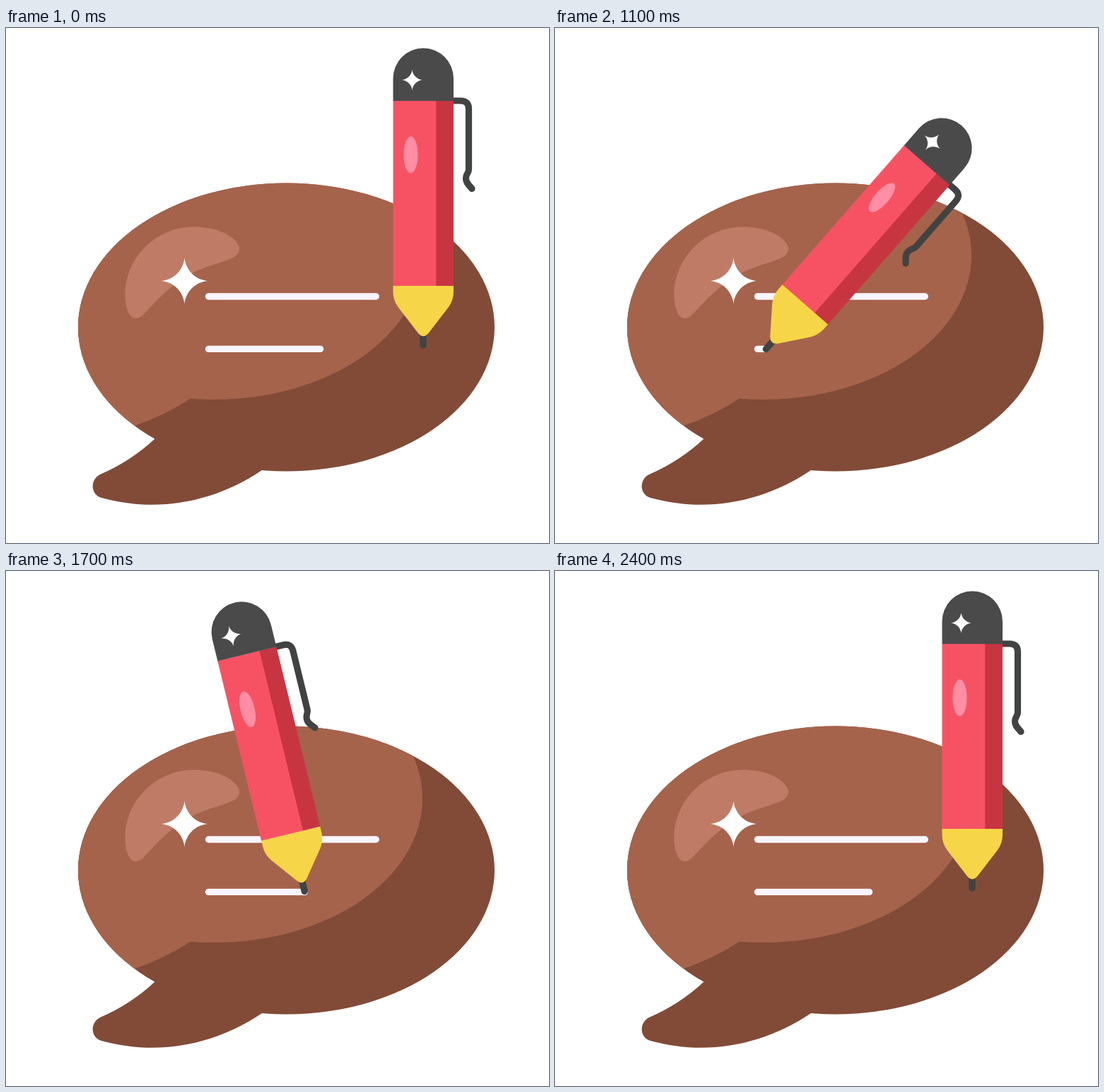
An HTML page with a canvas that plays this animation: 768 by 729 pixels, repeating every 2.7 s.

```html
<!DOCTYPE html>
<html lang="en">
<head>
<meta charset="utf-8">
<title>Pen and speech bubble</title>
<style>
html, body { margin: 0; width: 100%; height: 100%; overflow: hidden; background: #fff; }
canvas { display: block; }
</style>
</head>
<body>
<canvas id="stage" width="768" height="729"></canvas>
<script>
const ctx = document.getElementById('stage').getContext('2d');
const LOOP = 2700, STEP = 100;
const LINE = { left: 286.5, right: 444.5, y: 454.4 };

// Pen tip and tilt (degrees) at the ends of each move
const REST = { x: 590, y: 449.5, tilt: 0 };
const START = { x: 286.5, y: 455, tilt: 46.2 };
const END = { x: 444.5, y: 453.7, tilt: -23.4 };

const reach = [[300, 0], [600, 0.7], [700, 0.89], [800, 1]];
const write = [[1000, 0], [1100, 0.073], [1300, 0.402], [1700, 0.86], [1800, 1]];
const leave = [[1900, 0], [2400, 1]];

const mix = (a, b, p) => a + (b - a) * p;
const mixPose = (a, b, p) => ({
  x: mix(a.x, b.x, p), y: mix(a.y, b.y, p), tilt: mix(a.tilt, b.tilt, p)
});

function progress(keys, t) {
  if (t <= keys[0][0]) return 0;
  for (let i = 1; i < keys.length; i++) {
    const [t0, v0] = keys[i - 1], [t1, v1] = keys[i];
    if (t <= t1) return mix(v0, v1, (t - t0) / (t1 - t0));
  }
  return 1;
}

function fill(path, color) {
  ctx.fillStyle = color;
  ctx.fill(new Path2D(path));
}

function oval(x, y, rx, ry, color) {
  ctx.beginPath();
  ctx.ellipse(x, y, rx, ry, 0, 0, Math.PI * 2);
  ctx.fillStyle = color;
  ctx.fill();
}

function stroke(path, color, width) {
  ctx.strokeStyle = color;
  ctx.lineWidth = width;
  ctx.lineCap = 'round';
  ctx.stroke(new Path2D(path));
}

function star(x, y, r) {
  const a = r * 0.05, b = r * 0.47;
  ctx.save();
  ctx.translate(x, y);
  ctx.beginPath();
  ctx.moveTo(0, -r);
  for (let i = 0; i < 4; i++) {
    ctx.bezierCurveTo(a, -b, b, -a, r, 0);
    ctx.rotate(Math.PI / 2);
  }
  ctx.fillStyle = '#fff';
  ctx.fill();
  ctx.restore();
}

function drawBubble() {
  const dark = '#824b37', light = '#a5634c';
  fill('M211 581 Q177 613 133 632 C119 639 119 660 135 665 ' +
       'C215 687 295 671 362 626 L330 560 Z', dark);
  oval(396.5, 423.5, 294.5, 204, dark);

  ctx.save();
  ctx.beginPath();
  ctx.ellipse(396.5, 423.5, 294.5, 204, 0, 0, Math.PI * 2);
  ctx.clip();
  oval(294.5, 322, 294.5, 204, light);
  fill('M261 524.5 Q225 548 182 563 L90 580 V300 H261 Z', light);
  ctx.restore();

  fill('M168.5 378 C168.5 325 212 281.5 266 281.5 C294 281.5 319 291 328 306 ' +
       'C333 314 329 321 320 325.5 C300 335 266 339 236 365 ' +
       'C215 382 203 397 194 406 C187 412.5 180 413 175 406 ' +
       'C170.5 399 168.5 389 168.5 378 Z', '#bf7b65');
  star(252.5, 358, 32.5);
}

function drawLine(x0, x1, y) {
  stroke(`M${x0} ${y} H${x1}`, '#f7f5ff', 9.4);
}

function drawPen({ x, y, tilt }) {
  ctx.save();
  ctx.translate(x, y);
  ctx.rotate(tilt * Math.PI / 180);
  ctx.translate(-REST.x, -REST.y);

  stroke('M633 103 H643 Q654.5 103 654.5 114.5 V200 C654.5 206 650.5 206 650.5 213 ' +
         'C650.5 219 654.5 222 659 227.5', '#414342', 9.2);
  stroke('M590 430 V449', '#414342', 9.4);
  fill('M547.5 364.5 H633 V374 Q633 385 626 395 L597.5 432 Q590.2 440.5 583 432 ' +
       'L554.5 395 Q547.5 385 547.5 374 Z', '#f7d548');
  fill('M547.5 103 H609 V365 H547.5 Z', '#f75264');
  fill('M608.3 103 H633 V365 H608.3 Z', '#c73541');
  fill('M547.5 103.3 V71.3 A42.75 42.75 0 0 1 633 71.3 V103.3 Z', '#4a4a4a');
  oval(572.5, 179.5, 10, 26, '#ff8ea5');
  star(574.5, 73.5, 14.5);
  ctx.restore();
}

function draw(t) {
  let pose, from = LINE.left, to = LINE.right;
  if (t < 1000) {
    const p = progress(reach, t);
    pose = mixPose(REST, START, p);
    from = mix(LINE.left, LINE.right, p);
  } else if (t < 1900) {
    const p = progress(write, t);
    pose = mixPose(START, END, p);
    to = mix(LINE.left, LINE.right, p);
  } else {
    pose = mixPose(END, REST, progress(leave, t));
  }

  ctx.fillStyle = '#fff';
  ctx.fillRect(0, 0, 768, 729);
  drawBubble();
  drawLine(LINE.left, 523.3, 380);
  if (to > from) drawLine(from, to, LINE.y);
  drawPen(pose);
}

const begin = performance.now();
function tick() {
  const t = (performance.now() - begin) % LOOP;
  draw(Math.floor(t / STEP) * STEP);
  requestAnimationFrame(tick);
}
tick();
</script>
</body>
</html>
```
